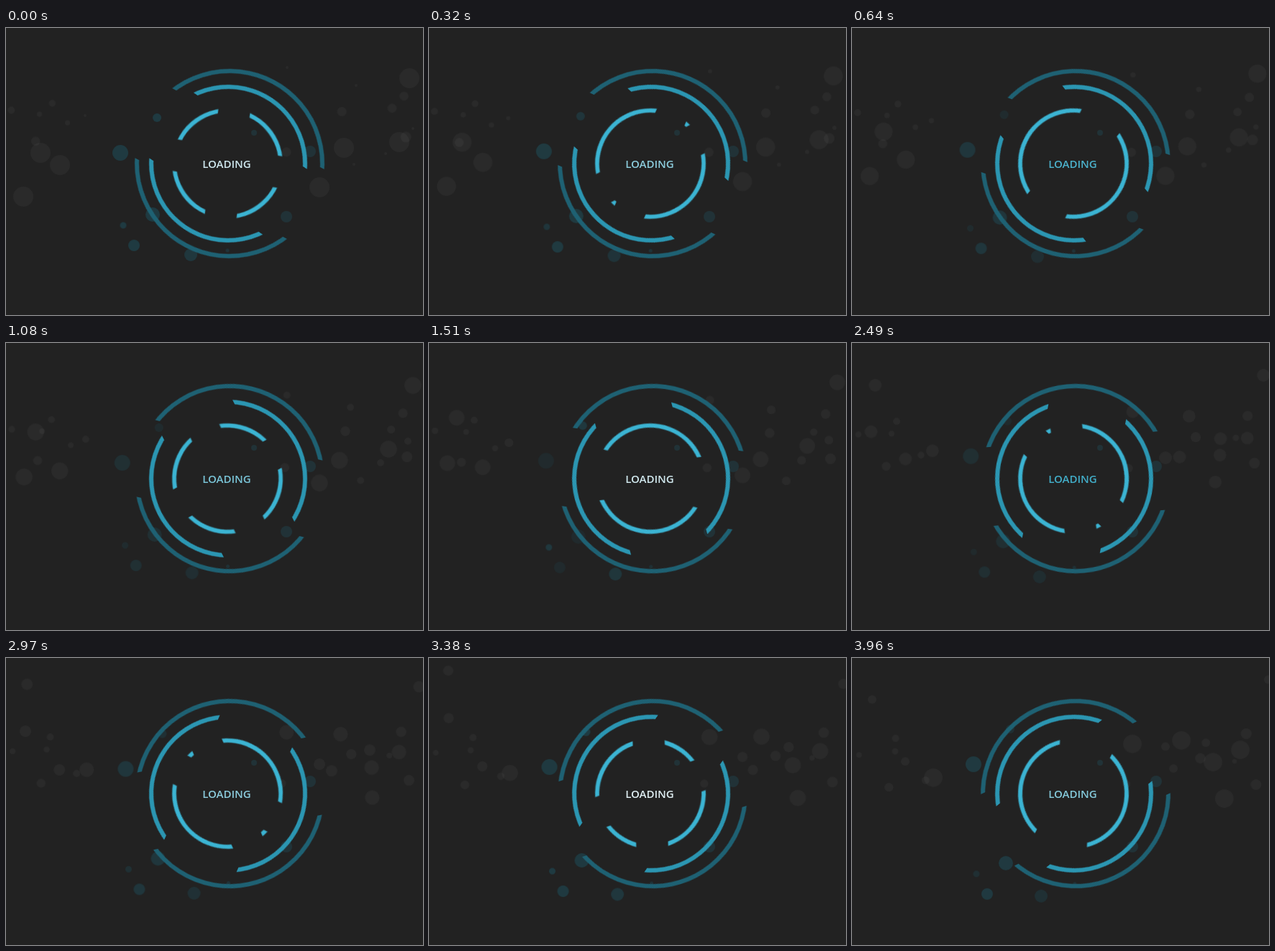
These frames come from a looping animation (580x400 px, 3.98 s). An HTML page:

```html
<!DOCTYPE html>
<html lang="en">
<head>
<meta charset="utf-8">
<title>Loading</title>
<style>
  html, body { margin: 0; width: 100%; height: 100%; overflow: hidden; background: #222; }
  svg { display: block; width: 580px; height: 400px; }
  .ring { fill: none; stroke-width: 6; }
  .spin { animation: spin 3980ms linear infinite; }
  @keyframes spin {
    from { transform: rotate(var(--from)); }
    to { transform: rotate(var(--to)); }
  }
  .wide { clip-path: url(#wide); }
  .slim { clip-path: url(#slim); }
  .outer { --from: 28.1deg; --to: -25.3deg; }
  .middle { --from: 34deg; --to: 141.2deg; }
  .inner { --from: 97.3deg; --to: 298.3deg; }
  /* nested in .inner, so this turn is relative to it */
  .counter { --from: -88deg; --to: -747.8deg; }
  text {
    font: 600 15px "Open Sans", "Noto Sans", sans-serif;
    text-anchor: middle;
    animation: glow 3980ms linear infinite;
  }
  @keyframes glow {
    0% { fill: #cfe8ef; }
    18.8%, 64.1% { fill: #36a9c6; }
    41.5%, 86.7% { fill: #eef5f7; }
    100% { fill: #81c8da; }
  }
</style>
</head>
<body>
<svg viewBox="0 0 580 400">
  <defs>
    <clipPath id="wide">
      <rect x="-150" y="-150" width="300" height="95"/>
      <rect x="-150" y="55" width="300" height="95"/>
    </clipPath>
    <clipPath id="slim">
      <rect x="-150" y="-150" width="300" height="127.7"/>
      <rect x="-150" y="22.3" width="300" height="127.7"/>
    </clipPath>
  </defs>
  <g id="dust" fill="#fff" fill-opacity=".04"></g>
  <g id="sparks" fill="#1a96b8" fill-opacity=".22"></g>
  <g transform="translate(311 189)">
    <g class="spin wide outer"><circle class="ring" r="129" stroke="#1e6173"/></g>
  </g>
  <g transform="translate(309 189)">
    <g class="spin wide middle"><circle class="ring" r="107" stroke="#2b96b2"/></g>
  </g>
  <g transform="translate(308 189)">
    <g class="spin slim inner">
      <g class="spin slim counter"><circle class="ring" r="74" stroke="#3bb4d3"/></g>
    </g>
  </g>
  <text x="307" y="195">LOADING</text>
</svg>
<script>
  const LOOP = 3980, STEPS = 20;
  const mix = (a, b, u) => a + (b - a) * u;

  let seed = 7;
  function random(min, max) {
    seed = (seed * 16807) % 2147483647;
    return mix(min, max, seed / 2147483647);
  }

  function addBubble(parent, pose) {
    const dot = document.createElementNS("http://www.w3.org/2000/svg", "circle");
    dot.setAttribute("r", 1);
    document.getElementById(parent).append(dot);
    const frames = Array.from({ length: STEPS + 1 }, (_, i) => {
      const [x, y, r, opacity = 1] = pose(i / STEPS);
      return { transform: `translate(${x}px, ${y}px) scale(${r})`, opacity };
    });
    dot.animate(frames, { duration: LOOP, iterations: Infinity });
  }

  function addDust([x0, y0, x1, y1], r0, r1) {
    addBubble("dust", u => [mix(x0, x1, u), mix(y0, y1, u), mix(r0, r1, u)]);
  }

  // Large dust: start and end points
  const waning = [
    [24, 235, 28, 57], [75, 191, 74, 144], [48, 174, 23, -10],
    [436, 222, 436, 123], [470, 167, 447, 154], [547, 159, 492, 118], [561, 70, 579, 30]
  ];
  const waxing = [
    [110, 122, 113, 167], [391, 55, 390, 120], [487, 80, 458, 115],
    [528, 175, 502, 145], [566, 140, 540, 128], [484, 190, 518, 196]
  ];
  waning.forEach(path => addDust(path, 14, 6));
  waxing.forEach(path => addDust(path, 2, 13));

  // Small dust on either side of the rings
  for (let i = 0; i < 10; i++) {
    const x = i % 2 ? random(0, 125) : random(390, 570);
    const y = random(90, 180);
    addDust([x, y, x + random(-20, 20), y + random(-10, 50)], random(3, 8), random(3, 8));
  }

  // Sparks on the left drift away from mid-height and flicker; the rest hold still
  const sparks = [
    [159, 174, 11], [210, 125, 6], [178, 303, 8], [163, 275, 4.5], [204, 260, 10],
    [257, 316, 9], [308, 310, 2.5], [390, 263, 8], [345, 146, 4], [423, 172, 8]
  ];
  sparks.forEach(([x, y, r], i) => {
    const loose = Math.min(1, Math.max(0, (330 - x) / 120));
    const drift = loose * Math.sign(y - 217) * 26;
    const flickers = i % 2 ? 2.3 : 1.1;
    addBubble("sparks", u => [
      x + 10 * loose * u,
      y + drift * u,
      r,
      0.65 + 0.35 * loose * Math.cos(2 * Math.PI * flickers * u)
    ]);
  });
</script>
</body>
</html>
```
